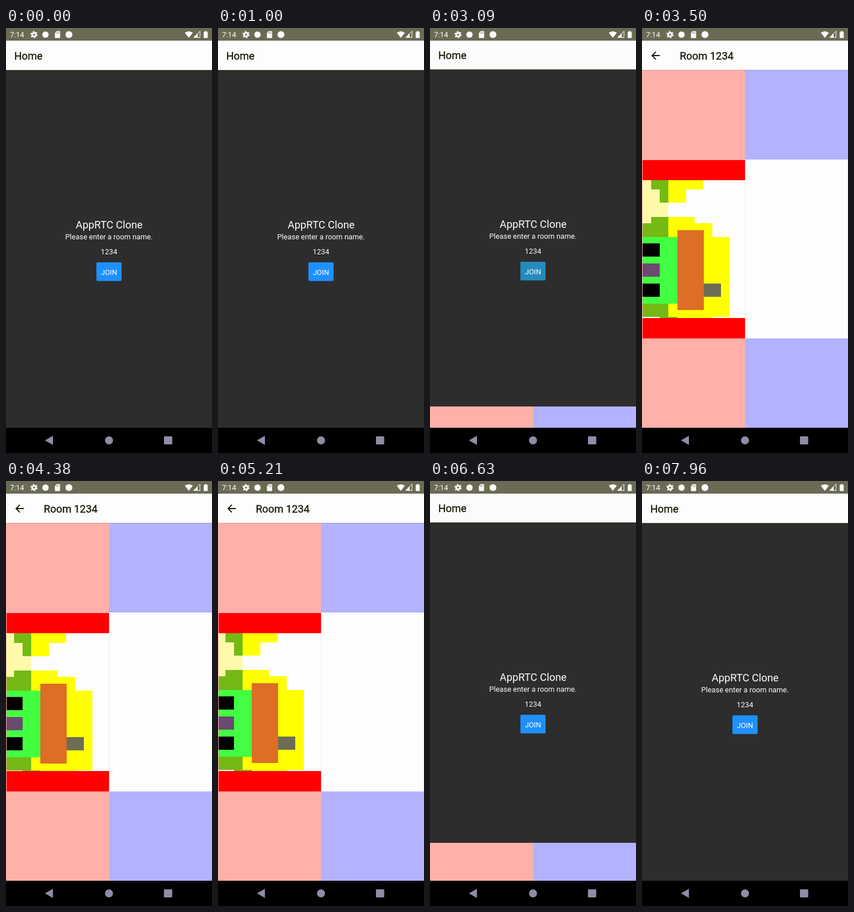
An HTML page that plays this animation: 360x740 px, repeating every 8000 ms.

```html
<!DOCTYPE html>
<html lang="en">
<head>
<meta charset="utf-8">
<style>
  html, body { margin: 0; width: 100%; height: 100%; overflow: hidden; background: #000; }
  svg { display: block; width: 360px; height: 740px; }
  text { font-family: Roboto, "Noto Sans", sans-serif; font-size: 12.83px; fill: #fff; }
  .title { font-size: 18.33px; }
  .bar { fill: #161604; stroke: #161604; stroke-width: .35px; }
  .mid { text-anchor: middle; }
  #scene { shape-rendering: crispEdges; }
</style>
</head>
<body>
<svg viewBox="0 0 360 740">
  <defs>
    <clipPath id="reveal"><rect id="window" width="360"/></clipPath>
    <clipPath id="video"><rect x="1" y="265" width="179" height="240"/></clipPath>
  </defs>

  <g id="home">
    <rect y="22" width="360" height="700" fill="#2d2d2d"/>
    <rect y="22" width="360" height="51" fill="#fdfdfd"/>
    <rect y="73" width="360" height="1" fill="#4a5430"/>
    <text class="title bar" x="14.5" y="54.5">Home</text>
    <text class="title mid" x="180.3" y="349">AppRTC Clone</text>
    <text class="mid" x="180" y="367.6">Please enter a room name.</text>
    <text class="mid" x="180" y="394">1234</text>
    <rect id="join" x="158" y="408" width="44" height="32.5" rx="2"/>
    <text class="mid" x="180" y="429.5">JOIN</text>
  </g>
  <rect id="shade" y="22" width="360" height="674"/>

  <g clip-path="url(#reveal)">
    <g id="room">
      <rect y="22" width="180" height="674" fill="#ffb0a8"/>
      <rect x="180" y="22" width="180" height="674" fill="#b2b2ff"/>
      <rect y="22" width="360" height="51" fill="#fdfdfd"/>
      <rect y="73" width="360" height="1" opacity=".15"/>
      <path d="M31 48H18M24.3 41.3L17.6 48l6.7 6.7" fill="none" stroke="#161604" stroke-width="1.9"/>
      <text class="title bar" x="66" y="54.5">Room 1234</text>
      <rect x="1" y="230" width="179" height="310.5" fill="red"/>
      <rect x="180" y="229" width="180" height="311.5" fill="#fdfdfd"/>
      <path d="M180.5 229v311M359.5 229v311" stroke="#ececf4"/>
      <g clip-path="url(#video)">
        <rect x="1" y="265" width="179" height="240" fill="#fdfdfd"/>
        <g id="scene"></g>
      </g>
    </g>
  </g>

  <rect width="360" height="22" fill="#6b6b55"/>
  <text x="7" y="16">7:14</text>
  <g fill="#fff">
    <circle cx="49" cy="11.5" r="3.2" fill="none" stroke="#fff" stroke-width="2.8"/>
    <circle cx="49" cy="11.5" r="5.2" fill="none" stroke="#fff" stroke-width="2" stroke-dasharray="2.72"/>
    <circle cx="69" cy="11.5" r="5.5"/>
    <path d="M88.5 5.5h5q1 0 1 1v10q0 1-1 1h-7q-1 0-1-1V9z"/>
    <path d="M88.5 7.5v2M90.5 7.5v2M92.5 7.5v2" stroke="#6b6b55"/>
    <circle cx="110" cy="11.5" r="6"/>
    <path d="M312.5 8.3q7-5.2 14 0L319.5 17z"/>
    <path d="M339 5.5V16.5H328z" fill="none" stroke="#fff"/>
    <path d="M335 9.5V16.5H328z"/>
    <path d="M347.5 5.5h3v1h1q1 0 1 1v9q0 1-1 1h-5q-1 0-1-1v-9q0-1 1-1h1z"/>
  </g>

  <rect y="696" width="360" height="44"/>
  <g fill="#908ca6">
    <path d="M68 718L82 710v16z"/>
    <circle cx="180" cy="718" r="7"/>
    <rect x="276" y="711" width="14.5" height="14" rx="1.5"/>
  </g>
</svg>
<script>
const LOOP = 8000, PRESS = 2840, OPEN = 3085, CLOSE = 6455, SLIDE = 425;
const TOP = 22, HEIGHT = 674;
const el = id => document.getElementById(id);

// Blocks of the camera picture: colour, then left, top, right, bottom
const blocks = [
  ['#fffaaa', -9, 255, 44, 341],
  ['#74b914', 14, 255, 44, 282], ['#74b914', 29, 282, 44, 305],
  ['#ff0', 44, 255, 105, 282], ['#ff0', 44, 282, 75, 305],
  ['#74b914', 14, 330, 44, 342], ['#74b914', -9, 341, 44, 365],
  ['#ff0', 44, 330, 90, 342], ['#ff0', 44, 341, 121, 365],
  ['#ff0', 44, 365, 151, 504], ['#74b914', -9, 481, 44, 504],
  ['#74b914', 29, 504, 60, 516], ['#ff0', 60, 504, 121, 516],
  ['#42ff42', -9, 365, 60, 481],
  ['#000', -9, 376, 29, 399], ['#6b4a70', -9, 411, 29, 434], ['#000', -9, 446, 29, 469],
  ['#dc6e26', 60, 353, 106, 492], ['#6d6d55', 106, 446, 136, 469]
];
el('scene').innerHTML = blocks.map(([c, l, t, r, b]) =>
  `<rect x="${l}" y="${t}" width="${r - l}" height="${b - t}" fill="${c}"/>`).join('');

const bezier = (a, b, s) => 3 * a * s * (1 - s) ** 2 + 3 * b * s * s * (1 - s) + s ** 3;
function ease(x) {
  if (x <= 0) return 0;
  if (x >= 1) return 1;
  let lo = 0, hi = 1;
  for (let i = 0; i < 24; i++) {
    const s = (lo + hi) / 2;
    if (bezier(0.20833, 0.25, s) < x) lo = s; else hi = s;
  }
  return bezier(0.82, 1, lo);
}
const shift = (id, x, y) => el(id).setAttribute('transform', `translate(${x} ${y})`);

function draw(t) {
  const p = ease((t - OPEN) / SLIDE) - ease((t - CLOSE) / SLIDE);
  const edge = Math.round(HEIGHT * (1 - p));
  el('window').setAttribute('y', TOP + edge);
  el('window').setAttribute('height', HEIGHT - edge);
  shift('room', 0, Math.round(HEIGHT * 0.041 * (1 - p)));
  shift('home', 0, Math.round(HEIGHT * -0.02 * p));
  el('shade').setAttribute('opacity', 0.1 * p);
  el('join').setAttribute('fill', t >= PRESS && t < CLOSE ? '#258bbe' : '#1e90ff');

  // Slow sway of the hand-held camera
  const s = Math.max(t, 3500) / 1000;
  shift('scene', Math.round(3 * Math.exp((3.5 - s) / 0.8) - 1),
    Math.round(0.5 * Math.cos((s - 4.38) * 1.94) - 0.5));
}

const start = performance.now();
function tick() {
  draw((performance.now() - start) % LOOP);
  requestAnimationFrame(tick);
}
tick();
</script>
</body>
</html>
```
